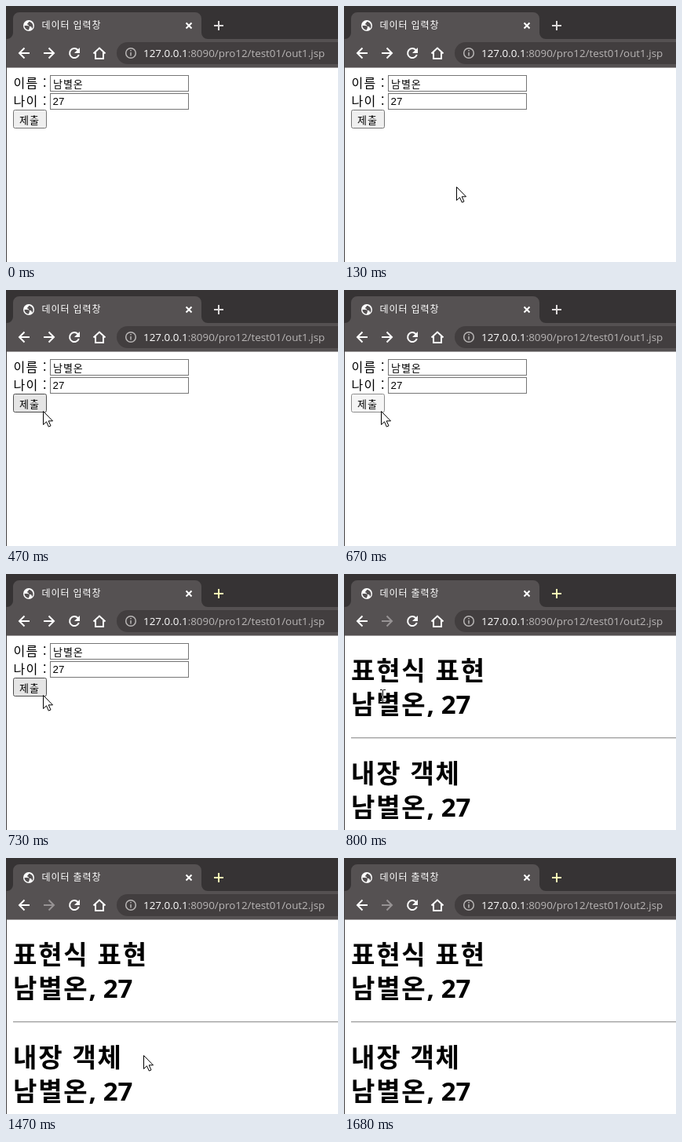
An HTML page for the animation above (2.15 s loop, 423 by 326 pixels).

```html
<!DOCTYPE html>
<html lang="ko">
<head>
<meta charset="utf-8">
<title>데이터 입력창</title>
<style>
  html, body { margin: 0; width: 100%; height: 100%; overflow: hidden; background: #fff; }
  svg { display: block; width: 100%; height: 100%; }
  text {
    font: 16px "Noto Sans CJK KR", "Noto Sans CJK", "Noto Sans CJK JP", sans-serif;
    letter-spacing: .075em;
    white-space: pre;
  }
  .title { font-size: 12px; fill: #fff; }
  .url { font: 13.4px "Open Sans", "Noto Sans", sans-serif; letter-spacing: 0; fill: #b9b6b6; }
  .field { font-size: 13px; }
  .number { font: 13.33px "Liberation Sans", Arial, sans-serif; letter-spacing: 0; }
  .heading { font-size: 33px; font-weight: 700; letter-spacing: .055em; }
  .latin { font-family: "Open Sans", "Noto Sans", sans-serif; letter-spacing: 0; }
  .icon { fill: none; stroke: #fff; stroke-width: 2; }
  .box { fill: #fff; stroke: #767676; }
</style>
</head>
<body>
<svg viewBox="0 0 423 326">
  <rect width="423" height="326" fill="#fff"/>

  <!-- Browser frame -->
  <rect width="423" height="42" fill="#363334"/>
  <path fill="#555152" d="M0 78V42H1a8 8 0 0 0 8-8V16a8 8 0 0 1 8-8H241a8 8 0 0 1 8 8V34a8 8 0 0 0 8 8H423V78Z"/>
  <path d="M0 78.500H423" stroke="#a09d9e"/>
  <rect x="141" y="46" width="300" height="28" rx="14" fill="#423e3f"/>
  <path d="M.5 42V326" stroke="#454243"/>

  <circle cx="29" cy="25" r="7" fill="#fff"/>
  <path fill="#555152" d="M23.500 25h3.500c2 0 3 1 3 2.500s-1 1-1 3c-3 0-5.500-2.500-5.500-5.500ZM29 20c3 0 5.500 2.500 5.500 5.500 0 1.500-.5 2.500-1.500 3.500 0-2-.5-3-2.500-3s-1-2-3-2.500 1-1 1.500-3.500Z"/>
  <text class="title" id="title" x="45.500" y="29"></text>
  <path class="icon" d="M229.500 21.500l7 7m0-7l-7 7"/>
  <path class="icon" id="plus" d="M265 25h12m-6-6v12"/>

  <path class="icon" d="M30 60H17m6.500-6.500L17 60l6.500 6.500"/>
  <path class="icon" id="forward" d="M48 60H61m-6.500-6.500L61 60l-6.500 6.500"/>
  <path class="icon" d="M91.500 56a6 6 0 1 0 1.300 6"/>
  <path fill="#fff" d="M94 53v7h-7Z"/>
  <path class="icon" d="M111.500 60.500l7.500-7 7.500 7M114 59v8h10v-8"/>
  <g fill="none" stroke="#b9b6b6" stroke-width="1.500">
    <circle cx="159" cy="60" r="6.300"/>
    <path d="M159 59v4.500m0-7.500v1.500"/>
  </g>
  <text class="url" x="175" y="65"><tspan fill="#fff">127.0.0.1</tspan>:8090/pro12/test01/<tspan id="file"></tspan></text>

  <!-- Input page -->
  <g id="input">
    <text x="9.500" y="104">이름 :</text>
    <text x="9.500" y="127">나이 :</text>
    <rect class="box" x="56.500" y="88.500" width="176" height="20"/>
    <rect class="box" x="56.500" y="111.500" width="176" height="20"/>
    <text class="field" x="60" y="103.500">남별온</text>
    <text class="number" x="59.500" y="126">27</text>
    <rect id="button" x="9.500" y="132.500" width="42" height="23" rx="2"/>
    <text class="field" x="17" y="149.500">제출</text>
  </g>

  <!-- Output page -->
  <g id="output">
    <text class="heading" x="9" y="135">표현식 표현</text>
    <text class="heading" x="9" y="178">남별온<tspan class="latin">, 27</tspan></text>
    <path d="M9 208.500H423" stroke="#9a9a9a"/>
    <path d="M9 209.500H423" stroke="#e6e6e6"/>
    <text class="heading" x="9" y="266">내장 객체</text>
    <text class="heading" x="9" y="309">남별온<tspan class="latin">, 27</tspan></text>
  </g>

  <path id="arrow" fill="#fff" stroke="#000" d="M.5.5V17.500l4-3.700 2.800 6.300 2.700-1.200-2.800-6.100h5.300Z"/>
  <path id="beam" fill="none" stroke="#fff" style="mix-blend-mode:difference" d="M-3.500-7.500h3m1 0h3M0-7V7M-3.500 7.500h3m1 0h3"/>
</svg>
<script>
const LOOP = 2150, TICK = 66.7;
const HOVER = 6, CLICK = 10, RELEASE = 11, LOAD = 12, LEAVE = 18, GONE = 25;
const el = id => document.getElementById(id);
const show = (id, on) => el(id).setAttribute("visibility", on ? "visible" : "hidden");

function pointer(tick) {
  if (tick < 1 || tick >= GONE) return null;
  if (tick < LOAD) {
    const left = Math.max(0, (7 - tick) / 6) ** 2.4;
    return { x: 47 + 148 * left, y: 153.5 + 118 * left };
  }
  const gone = Math.max(0, (tick - LEAVE) / 6);
  return { x: 49.5 + 236 * gone ** 1.55, y: 155 + 160 * gone ** 1.25 };
}

function placePointer(tick) {
  const p = pointer(tick);
  const overText = p && tick >= LOAD && p.y < 187;
  show("arrow", p && !overText);
  show("beam", overText);
  if (!p) return;
  const x = overText ? Math.floor(p.x) + 0.5 : Math.round(p.x);
  el(overText ? "beam" : "arrow").setAttribute("transform", `translate(${x} ${Math.round(p.y)})`);
}

function draw(time) {
  const tick = Math.floor((time % LOOP + 4) / TICK);
  const loaded = tick >= LOAD;
  show("input", !loaded);
  show("output", loaded);
  el("title").textContent = loaded ? "데이터 출력창" : "데이터 입력창";
  el("file").textContent = loaded ? "out2.jsp" : "out1.jsp";
  el("forward").style.stroke = loaded ? "#979394" : "#fff";
  el("plus").style.stroke = tick >= RELEASE ? "#ffffb4" : "#dddada";

  const [fill, stroke] = tick === CLICK ? ["#f5f5f5", "#8d8d8d"]
    : tick >= HOVER ? ["#e5e5e5", "#4f4f4f"] : ["#efefef", "#767676"];
  el("button").setAttribute("fill", fill);
  el("button").setAttribute("stroke", stroke);
  placePointer(tick);
}

const start = performance.now();
function frame() {
  draw(performance.now() - start);
  requestAnimationFrame(frame);
}
frame();
</script>
</body>
</html>
```
